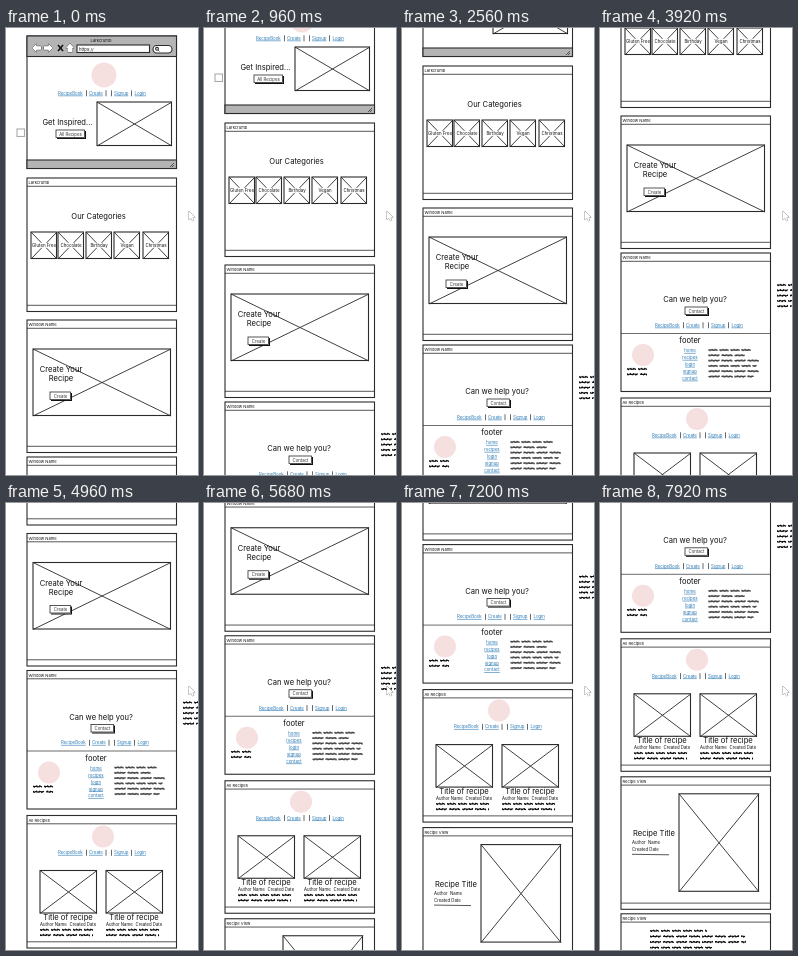
Write an HTML page with a canvas that moves like this. It is 192 px wide and 447 px high and loops after 8 s.

```html
<!DOCTYPE html>
<html lang="en">
<head>
<meta charset="utf-8">
<title>Scrolling wireframes</title>
<style>
html, body { margin: 0; width: 100%; height: 100%; overflow: hidden; background: #fff; }
canvas { display: block; width: 192px; height: 447px; }
</style>
</head>
<body>
<canvas id="stage" width="192" height="447"></canvas>
<script>
const ctx = document.getElementById('stage').getContext('2d');
const INK = '#2b2b2b', LINK = '#2878b4', GREY = '#b4b4b4', PINK = '#f5dfdf';
const BRAND = 'Larkcrumb';
const LOOP = 8000, STEP = 80;
// [time in ms, page scroll in px]
const SCROLL = [[0, 0], [960, 55], [2560, 112], [3920, 204], [4960, 261.5], [6400, 331], [7920, 438.2]];

function scrollAt(t) {
  const i = Math.max(1, SCROLL.findIndex(k => k[0] >= t));
  const [t0, y0] = SCROLL[i - 1], [t1, y1] = SCROLL[i];
  return y0 + (y1 - y0) * (t - t0) / (t1 - t0);
}

function path(points, color = INK, width = 0.9, close = false) {
  ctx.beginPath();
  points.forEach(([x, y]) => ctx.lineTo(x, y));
  if (close) ctx.closePath();
  ctx.strokeStyle = color;
  ctx.lineWidth = width;
  ctx.stroke();
}

const line = (x0, y0, x1, y1, color, width) => path([[x0, y0], [x1, y1]], color, width);

function box(x0, y0, x1, y1, fill = '#fff', color = INK, width = 1.1) {
  ctx.fillStyle = fill;
  ctx.fillRect(x0, y0, x1 - x0, y1 - y0);
  ctx.strokeStyle = color;
  ctx.lineWidth = width;
  ctx.strokeRect(x0, y0, x1 - x0 - 0.5, y1 - y0 - 0.5);
}

function text(str, x, y, size = 4.4, align = 'left', color = '#111') {
  ctx.font = `${size}px Inter, sans-serif`;
  ctx.textAlign = align;
  ctx.fillStyle = color;
  ctx.fillText(str, x, y);
}

const heading = (str, x, y) => text(str, x, y, 7.6, 'center');

function link(str, x, y, align) {
  text(str, x, y, 4.4, align, LINK);
  const w = ctx.measureText(str).width;
  const left = align === 'center' ? x - w / 2 : x;
  line(left, y + 1, left + w, y + 1, LINK, 0.6);
}

function logo(x, y, r) {
  ctx.fillStyle = PINK;
  ctx.beginPath();
  ctx.arc(x, y, r, 0, 7);
  ctx.fill();
}

function picture(x0, y0, x1, y1) {
  box(x0, y0, x1, y1);
  line(x0, y0, x1, y1);
  line(x0, y1, x1, y0);
}

function button(str, x0, y0, x1, y1) {
  ctx.fillStyle = '#111';
  ctx.fillRect(x0 + 1, y0 + 1, x1 - x0, y1 - y0);
  box(x0, y0, x1, y1, '#fff', INK, 0.8);
  text(str, (x0 + x1) / 2, y0 + 5.6, 4.3, 'center', '#333');
}

function panel(title, y0, y1, footBar = true) {
  box(21, y0, 171, y1);
  text(title, 22.5, y0 + 6.1, 4.1);
  line(21, y0 + 8.3, 171, y0 + 8.3, INK, 0.8);
  if (footBar) line(21, y1 - 6.7, 171, y1 - 6.7, INK, 0.8);
}

function nav(x, y) {
  link('RecipeBook', x, y);
  link('Create', x + 31, y);
  link('Signup', x + 56, y);
  link('Login', x + 76.5, y);
  for (const dx of [28.5, 48, 53.5, 73.5]) line(x + dx, y - 4.5, x + dx, y + 1.5, '#444', 0.8);
}

// Scribbled words standing in for a paragraph.
function scribble(x, y, widths, gap = 5.3) {
  widths.forEach((w, row) => {
    const base = y + row * gap;
    const word = row % 3 ? 13 : 11;
    for (let i = 0; i < w; i++) {
      if (i % word >= word - 2) continue;
      const h = 1.5 + 0.4 * Math.sin(i * 2.3 + row);
      ctx.fillStyle = '#111';
      ctx.fillRect(x + i, base - h / 2 + 0.3 * Math.sin(i * 1.7), 1.05, h);
    }
  });
}

function arrow(x, dir) {
  const shape = [[-4.5, 0], [0, -4], [0, -1.8], [4.5, -1.8], [4.5, 1.8], [0, 1.8], [0, 4]];
  ctx.fillStyle = '#fff';
  path(shape.map(([dx, dy]) => [x - dx * dir, 20 + dy]), INK, 0.8, true);
  ctx.fill();
}

function browser() {
  box(21, 8, 171, 141);
  box(21, 8, 171, 29, GREY);
  box(21, 132, 171, 141, GREY);
  text(BRAND, 95, 13.5, 4.1, 'center');
  arrow(30.5, -1);
  arrow(42.5, 1);
  line(52, 17, 57, 23, '#111', 1.5);
  line(57, 17, 52, 23, '#111', 1.5);
  ctx.fillStyle = '#fff';
  path([[60, 20], [64, 15.5], [68, 20], [66.5, 20], [66.5, 24], [61.5, 24], [61.5, 20]], INK, 0.8, true);
  ctx.fill();
  box(71, 17, 144, 25);
  text('https://', 73, 22.7, 4.3);
  ctx.fillStyle = '#fff';
  ctx.beginPath();
  ctx.roundRect(147, 17.5, 19, 7.5, 3.7);
  ctx.fill();
  ctx.stroke();
  ctx.beginPath();
  ctx.arc(151, 20.8, 1.4, 0, 7);
  ctx.stroke();
  line(152, 22, 153.5, 23.5, INK, 0.8);
  for (const d of [0, 2]) line(164 + d, 139, 168, 135 + d, INK, 0.7);

  logo(98, 47, 12.5);
  nav(52, 66.8);
  heading('Get Inspired...', 61.5, 96.5);
  button('All Recipes', 50, 102, 79, 110);
  picture(91, 74, 166, 118);
  box(11, 101, 19, 109, '#fff', '#aaa');
}

function categories() {
  panel(BRAND, 150, 284);
  heading('Our Categories', 92.5, 191);
  const names = ['Gluten Free', 'Chocolate', 'Birthday', 'Vegan', 'Christmas'];
  [25, 52, 80, 108, 137].forEach((x, i) => {
    picture(x, 204, x + 26, 231);
    ctx.fillStyle = '#fff';
    ctx.fillRect(x + 2, 214.8, 22, 5);
    text(names[i], x + 13, 218.8, 4.4, 'center');
  });
}

function createRecipe() {
  panel('Window Name', 292, 425);
  picture(27, 321, 165, 388);
  heading('Create Your', 55, 344);
  heading('Recipe', 55, 353);
  button('Create', 44, 364, 65, 372);
}

function footer() {
  panel('Window Name', 429, 568, false);
  heading('Can we help you?', 95, 478);
  button('Contact', 85, 483, 108, 491);
  nav(55, 502.8);
  line(21, 509.5, 171, 509.5, INK, 0.7);
  heading('footer', 90, 519);
  ['home', 'recipes', 'login', 'signup', 'contact'].forEach((s, i) => link(s, 90, 528.3 + i * 6.9, 'center'));
  logo(43, 531, 11);
  scribble(27, 545, [21, 20]);
  scribble(108.5, 526, [44, 36, 52, 48, 52, 45]);
  scribble(177, 461, [20, 20, 20, 20, 20]);
}

function allRecipes() {
  panel('All Recipes', 574, 707);
  logo(97, 595, 11);
  nav(52, 612.8);
  for (const x of [34, 100]) {
    picture(x, 629, x + 57, 672);
    heading('Title of recipe', x + 28, 678.5);
    text('Author Name', x, 684, 4.3);
    text('Created Date', x + 29.5, 684, 4.3);
    scribble(x, 688.3, [53, 53]);
  }
}

function recipeView() {
  panel('Recipe View', 712, 845);
  picture(79, 729, 159, 827);
  heading('Recipe Title', 54, 771.5);
  text('Author  Name', 32, 779.5, 4.3);
  text('Created Date', 32, 786.5, 4.3);
  line(32, 789.5, 69, 790, INK, 0.8);
  panel('Recipe View', 849, 982);
  scribble(50, 866, [57, 95, 96, 62], 5.6);
}

function cursor() {
  ctx.fillStyle = '#fff';
  path([[183, 183], [183, 192], [185, 190], [186.5, 193], [187.7, 192.4], [186.4, 189.6], [189, 189.4]], '#777', 0.8, true);
  ctx.fill();
}

function draw(now) {
  const t = Math.floor((now % LOOP) / STEP) * STEP;
  ctx.fillStyle = '#fff';
  ctx.fillRect(0, 0, 192, 447);
  ctx.save();
  ctx.translate(0, -scrollAt(t));
  [browser, categories, createRecipe, footer, allRecipes, recipeView].forEach(part => part());
  ctx.restore();
  cursor();
}

const start = performance.now();
function tick() {
  draw(performance.now() - start);
  requestAnimationFrame(tick);
}
tick();
</script>
</body>
</html>
```
